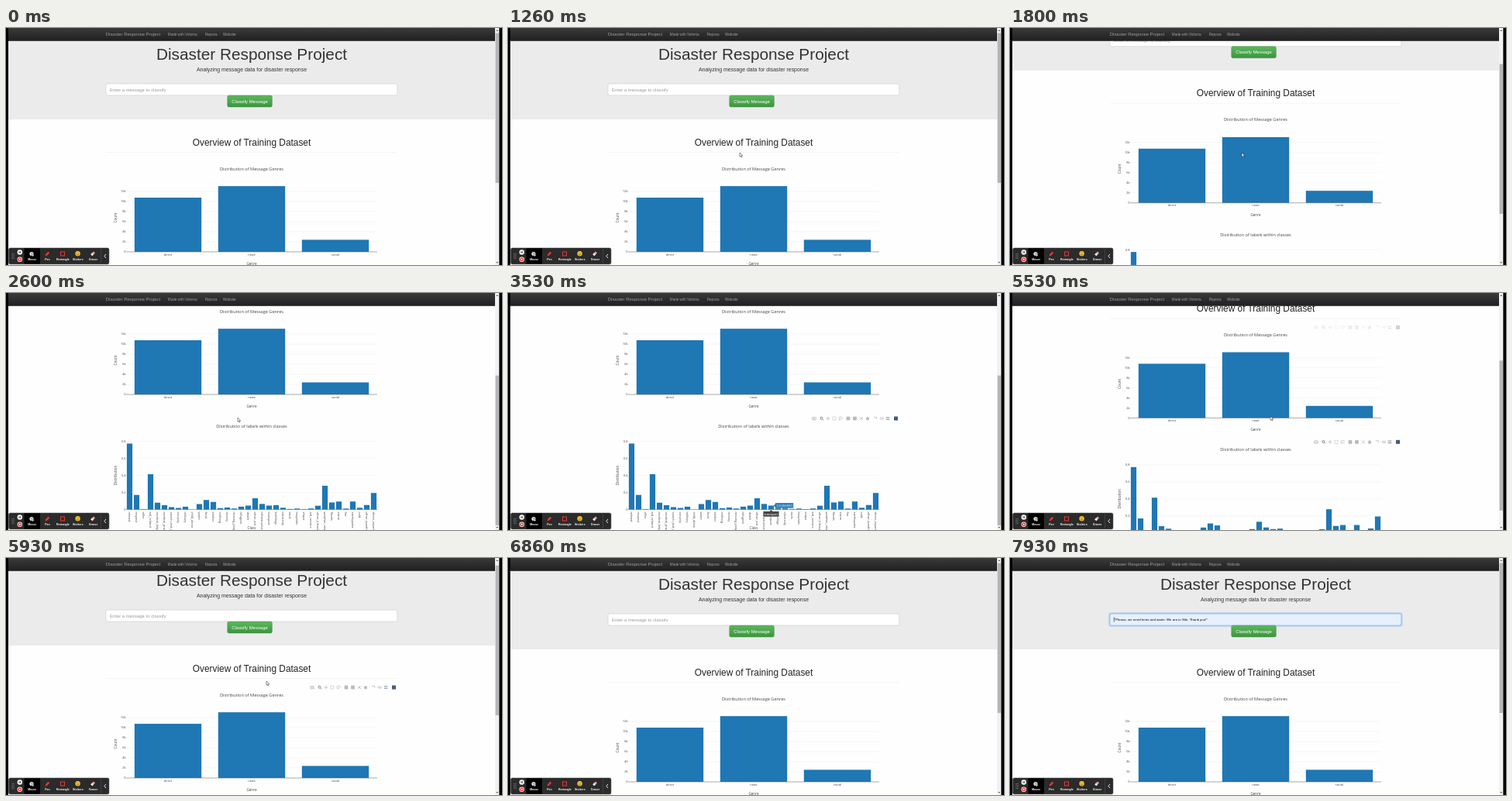
An HTML page for the animation above (8 s loop, 640 px wide and 306 px high).

```html
<!DOCTYPE html>
<html lang="en">
<head>
<meta charset="utf-8">
<title>Disaster Response Project</title>
<style>
html, body { margin: 0; width: 100%; height: 100%; overflow: hidden; background: #000; }
svg { display: block; width: 100%; height: 100%; font-family: "Liberation Sans", Arial, sans-serif; }
.plot { font-family: "Open Sans", sans-serif; fill: #444; }
.mid { text-anchor: middle; }
.end { text-anchor: end; }
.label { font-weight: bold; fill: #fff; text-anchor: middle; }
</style>
</head>
<body>
<svg id="stage" viewBox="0 0 640 306"></svg>
<script>
const LOOP = 8000;
const BLUE = '#1f77b4';
const ZERO_1 = 289, ZERO_2 = 437.5;
const LEFT = 155, RIGHT = 479, STEP = 9;

const genres = [['direct', 10766], ['news', 13054], ['social', 2396]];
const classes = Object.entries({
  related: .7736, request: .1706, offer: .0045, aid_related: .4143, medical_help: .0795,
  medical_products: .0501, search_and_rescue: .0276, security: .018, military: .0328,
  child_alone: 0, water: .0638, food: .1115, shelter: .0883, clothing: .0154, money: .023,
  missing_people: .0114, refugees: .0334, death: .0455, other_aid: .1314,
  infrastructure_related: .065, transport: .0458, buildings: .0508, electricity: .0203,
  tools: .0061, hospitals: .0108, shops: .0046, aid_centers: .0118,
  other_infrastructure: .0439, weather_related: .278627, floods: .0822, storm: .0932,
  fire: .0108, earthquake: .0936, cold: .0202, other_weather: .0525, direct_report: .1936
});

// [ms, value...]
const scrollKeys = [[1580, 0], [1660, 12], [1800, 63], [2000, 108], [2200, 142], [2330, 154], [2470, 158],
  [5320, 158], [5400, 150], [5530, 128], [5660, 85], [5800, 32], [5930, 5], [6070, 0]];
const pointerKeys = [[60, 338, 46], [460, 322, 64], [1060, 322, 64], [1260, 299, 161], [2700, 299, 161],
  [3330, 322, 222], [4130, 408, 258], [4260, 412, 265], [4460, 412, 265], [5000, 345, 175],
  [5260, 336, 159], [6200, 336, 159], [6800, 305, 80]];

const rect = (x, y, w, h, fill, more = '') =>
  `<rect x="${x}" y="${y}" width="${w}" height="${h}" fill="${fill}" ${more}/>`;
const line = (x1, y1, x2, y2, color, width = .5) =>
  `<path d="M${x1} ${y1}L${x2} ${y2}" stroke="${color}" stroke-width="${width}"/>`;
const circle = (x, y, r, fill) => `<circle cx="${x}" cy="${y}" r="${r}" fill="${fill}"/>`;
const text = (x, y, size, str, more = '') =>
  `<text x="${x}" y="${y}" font-size="${size}" ${more}>${str}</text>`;
const plotText = (x, y, size, str, cls = 'mid', more = '') =>
  text(x, y, size, str, `class="plot ${cls}" ${more}`);
const gradient = (id, top, bottom) =>
  `<linearGradient id="${id}" x2="0" y2="1"><stop stop-color="${top}"/><stop offset="1" stop-color="${bottom}"/></linearGradient>`;

function axes(title, titleY, zero, ticks, gap, xName, xNameY, yName) {
  const yMid = zero - 44;
  return plotText(317, titleY, 5.6, title) +
    ticks.map((s, i) => {
      const y = zero - i * gap;
      return (i ? line(LEFT, y, RIGHT, y, '#eee') : '') + plotText(LEFT - .5, y + 1.4, 3.96, s, 'end');
    }).join('') +
    plotText(317, xNameY, 4.62, xName) +
    plotText(0, 0, 4.62, yName, 'mid', `transform="translate(142.5 ${yMid})rotate(-90)"`);
}

function modebar(id, y) {
  const g = (x, d) => `<path transform="translate(${x} ${y})" d="${d}"/>`;
  const box = 'M-2-2H2V2H-2Z';
  return `<g id="${id}" fill="none" stroke="#444" stroke-width=".8" opacity="0"><g opacity=".36">` +
    g(395, 'M-2.3-1.3H-1L-.5-2H.5L1-1.3H2.3V1.8H-2.3ZM-.8.2A.8.8 0 1 0 .8.2A.8.8 0 1 0-.8.2') +
    g(413, 'M-2.5 0H2.5M0-2.5V2.5') +
    `<g stroke-dasharray="1 .5">${g(421, box)}</g>` +
    g(429, 'M-1 1C-4-1 0-3 2-1.6S1 1.5-1 1L-1.5 2.4') +
    `<g fill="#444">${g(439, box)}${g(447.5, box)}</g>` +
    g(456, 'M-2-2L2 2M2-2L-2 2') +
    `<g fill="#444">${g(464, 'M-2 0L0-2L2 0H1.4V1.8H-1.4V0Z')}</g>` +
    g(474, 'M-2-1.6H1.6V1') +
    g(482, 'M-2.4 0L-1-1H2.2V1H-1Z') + '</g><g opacity=".8">' +
    g(404.7, 'M-1.8-.4A1.5 1.5 0 1 0 1.2-.4A1.5 1.5 0 1 0-1.8-.4M.9.8L2.4 2.3') +
    g(490, 'M-2.3-1.2H2.3M-2.3 1.2H2.3') + '</g>' +
    rect(498, y - 2.5, 5, 5, '#42597a', 'stroke="none"') + '</g>';
}

const chart1 = axes('Distribution of Message Genres', 183.7, ZERO_1,
    ['0', '2k', '4k', '6k', '8k', '10k', '12k'], 13, 'Genre', 305.8, 'Count') +
  genres.map(([name, n], i) => {
    const x = 209 + i * 108, h = n * .0065;
    return rect(x - 43.2, ZERO_1 - h, 86.4, h, BLUE) + plotText(x, ZERO_1 + 4.5, 3.96, name);
  }).join('') + line(LEFT, ZERO_1, RIGHT, ZERO_1, '#555');

const chart2 = axes('Distribution of labels within classes', 332, ZERO_2,
    ['0', '0.2', '0.4', '0.6', '0.8'], 22, 'Class', 462.6, 'Distribution') +
  classes.map(([name, v], i) => {
    const x = LEFT + (i + .5) * STEP, h = v * 110;
    return rect(x - 3.6, ZERO_2 - h, 7.2, h, BLUE) +
      plotText(0, 0, 3.96, name, '', `transform="translate(${x - 1.3} ${ZERO_2 + 3})rotate(90)"`);
  }).join('') + line(LEFT, ZERO_2, RIGHT, ZERO_2, '#555');

const page = rect(3, -10, 628, 128, '#ebebeb') +
  text(317, 41, 20.8, 'Disaster Response Project', 'class="mid" fill="#333"') +
  text(317, 55.6, 6.93, 'Analyzing message data for disaster response', 'class="mid" fill="#333"') +
  rect(128.2, 71.2, 377.4, 16.6, 'none', 'id="glow" rx="2.6" stroke="#66afe9" stroke-width="2" opacity="0"') +
  rect(129, 72, 375.8, 15, '#fff', 'id="input" rx="2" stroke="#ccc" stroke-width=".6"') +
  text(134, 81.5, 5.94, 'Enter a message to classify', 'id="hint" fill="#999"') +
  text(134.6, 81.2, 4.4, '"Please, we need tents and water. We are in Silo. Thank you!"', 'id="message" fill="#000"') +
  `<g id="caret">${line(134.3, 76.5, 134.3, 82.5, '#000', .6)}</g>` +
  rect(285.7, 87, 57.7, 15, 'url(#green)', 'rx="2" stroke="#3e8f3e" stroke-width=".4"') +
  text(314.5, 96.6, 5.94, 'Classify Message', 'class="mid" fill="#fff"') +
  text(317, 151.5, 11.88, 'Overview of Training Dataset', 'class="mid" fill="#222"') +
  line(129, 160.5, 505, 160.5, '#eaeaea') +
  chart1 + chart2 + modebar('bar1', 172) + modebar('bar2', 320) +
  `<g id="tip"><g id="valueTip"><path id="valueBox" fill="${BLUE}" stroke="#fff" stroke-width=".3"/>` +
  text(7, 1.5, 4.3, '', 'id="valueText" fill="#fff"') + '</g><g id="nameTip">' +
  rect(0, 2.4, 0, 7, '#444', 'id="nameBox" stroke="#fff" stroke-width=".3"') +
  '<path d="M-2 2.5L0 .5L2 2.5Z" fill="#444"/>' +
  text(0, 7.4, 4.3, '', 'id="nameText" class="mid" fill="#fff"') + '</g></g>';

const nav = rect(3, 0, 628, 16.8, 'url(#dark)') +
  text(128.8, 10.2, 5.94, 'Disaster Response Project', 'fill="#9d9d9d"') +
  [[208.8, 'Made with Velonta'], [256.7, 'Repova'], [280, 'Website']]
    .map(([x, s]) => text(x, 9.8, 4.62, s, 'fill="#9d9d9d"')).join('');

const scrollbar = rect(631, 0, 5.6, 306, '#f1f1f1') +
  '<path d="M632.4 4L633.8 2.2L635.2 4ZM632.4 302L633.8 303.8L635.2 302Z" fill="#555"/>' +
  rect(631.6, 6.5, 4.4, 193.5, '#b5b5b5', 'id="thumb"');

const tools = rect(3.5, 284, 129.5, 21, '#2b2b2b', 'rx="2" stroke="#555" stroke-width=".5"') +
  [0, 1, 2, 3].map(i => circle(8, 291.5 + i * 2, .5, '#aaa') + circle(10, 291.5 + i * 2, .5, '#aaa')).join('') +
  circle(17.8, 289.5, 3.2, '#fff') + rect(16.5, 288.2, .9, 2.6, '#333') + rect(18.2, 288.2, .9, 2.6, '#333') +
  circle(17.8, 298.7, 3.2, '#fff') + circle(17.8, 298.7, 2.5, '#e53935') + rect(16.9, 297.8, 1.8, 1.8, '#fff') +
  rect(23.5, 284.5, 20.5, 20, '#000') +
  circle(33, 291.5, 2.6, '#ddd') + '<path d="M33 290.5L36.5 294L34.8 294.2L34 296Z" fill="#fff" stroke="#000" stroke-width=".4"/>' +
  '<path d="M50.5 294.5L51.3 292L54.5 288.8L56.2 290.4L53 293.7Z" fill="#e53935"/>' +
  rect(70.5, 289, 5, 5, 'none', 'stroke="#e53935" stroke-width="1"') +
  circle(92.6, 291.3, 3.2, '#f5c02c') + circle(91.5, 290.6, .45, '#333') + circle(93.7, 290.6, .45, '#333') +
  '<path d="M91 292.2Q92.6 294 94.2 292.2" fill="none" stroke="#333" stroke-width=".5"/>' +
  '<path d="M109.3 292.3L113 288.6L115 290.4L111.4 294.2Z" fill="#e9a2a2"/><path d="M109.3 292.3L111 290.6L113 292.5L111.4 294.2Z" fill="#eee"/>' +
  [[33.7, 'Mouse'], [53.4, 'Pen'], [73.3, 'Rectangle'], [92.8, 'Stickers'], [112.6, 'Eraser']]
    .map(([x, s]) => text(x, 299.8, 3.5, s, 'class="label"')).join('') +
  line(122.5, 285, 122.5, 304, '#555') +
  '<path d="M129 292L126.8 294.5L129 297" fill="none" stroke="#fff" stroke-width=".9"/>';

const $ = id => document.getElementById(id);
$('stage').innerHTML =
  `<defs>${gradient('dark', '#3a3a3a', '#202020')}${gradient('green', '#5cb85c', '#3d9440')}</defs>` +
  rect(3, 0, 628, 306, '#fefefe') + `<g id="page">${page}</g>` + nav + scrollbar +
  rect(0, 0, 3, 306, '#000') + rect(636.6, 0, 4, 306, '#000') + tools +
  '<path id="pointer" d="M0 0V5.2L1.2 4.2L2 6L2.9 5.6L2.1 3.9H3.7Z" fill="#fff" stroke="#222" stroke-width=".5"/>';

function sample(keys, t) {
  if (t <= keys[0][0]) return keys[0].slice(1);
  const i = keys.findIndex(k => k[0] > t);
  if (i < 0) return keys.at(-1).slice(1);
  const a = keys[i - 1], b = keys[i], p = (t - a[0]) / (b[0] - a[0]);
  return a.slice(1).map((v, j) => v + (b[j + 1] - v) * p);
}
const set = (id, attrs) => { for (const k in attrs) $(id).setAttribute(k, attrs[k]); };
const show = (id, on) => { $(id).style.display = on ? '' : 'none'; };
const ramp = (t, a, b) => Math.min(1, Math.max(0, (t - a) / (b - a)));

function drawTip(x) {
  const i = Math.floor((x - LEFT) / STEP), [name, v] = classes[i];
  const cx = LEFT + (i + .5) * STEP;
  $('valueText').textContent = v.toFixed(7);
  $('nameText').textContent = name;
  const w = $('valueText').getComputedTextLength() + 8.5;
  const n = $('nameText').getComputedTextLength() + 3.5;
  set('valueBox', { d: `M3 0L5.3-2V-3.4H${w}V3.4H5.3V2Z` });
  set('valueTip', { transform: `translate(${cx} ${ZERO_2 - v * 110})` });
  set('nameTip', { transform: `translate(${cx} ${ZERO_2})` });
  set('nameBox', { x: -n / 2, width: n });
}

function draw(t) {
  const [scroll] = sample(scrollKeys, t), [x, y] = sample(pointerKeys, t);
  const inPlot = t > 2700 && t < 5260 && y > 191 && y < 279;
  const focused = t >= 6930, filled = t >= 7400;
  set('page', { transform: `translate(0 ${-scroll})` });
  set('thumb', { y: 6.5 + scroll * .633 });
  set('pointer', { transform: `translate(${x} ${y})` });
  show('pointer', t >= 60 && !inPlot && t < 6740);
  show('tip', inPlot);
  if (inPlot) drawTip(x);
  set('bar1', { opacity: ramp(t, 5470, 5700) - ramp(t, 6400, 6650) });
  set('bar2', { opacity: ramp(t, 2720, 2980) - ramp(t, 5540, 5760) });
  set('glow', { opacity: focused ? .4 : 0 });
  set('input', { stroke: focused ? '#66afe9' : '#ccc', fill: filled ? '#e8f0fe' : '#fff' });
  show('hint', !filled);
  show('message', filled);
  show('caret', focused);
}

function tick(now) {
  draw(now % LOOP);
  requestAnimationFrame(tick);
}
requestAnimationFrame(tick);
</script>
</body>
</html>
```
